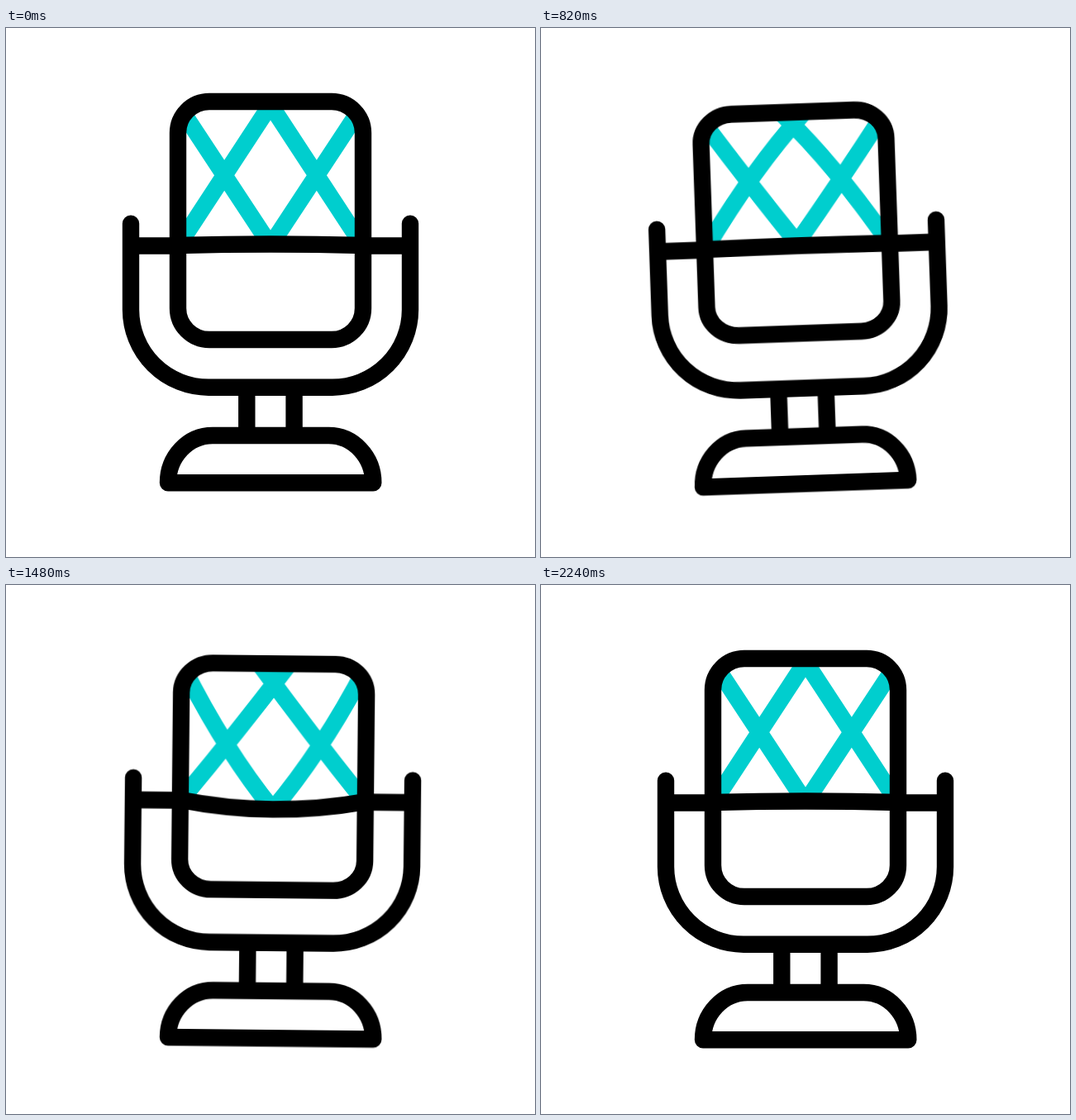
An HTML page without scripts that plays this animation: 640x640 px, repeating every 2.4 s.

```html
<!DOCTYPE html>
<html lang="en">
<head>
<meta charset="utf-8">
<title>Microphone</title>
<style>
  html, body { margin: 0; width: 100%; height: 100%; overflow: hidden; background: #fff; }
  svg { display: block; width: 100%; height: 100%; fill: none; stroke: #000; stroke-width: 20.4; }

  .hop, .tilt, .head, .seam, .net { animation: 2.4s cubic-bezier(.37, 0, .63, 1) infinite; }
  .hop  { animation-name: hop; }
  .tilt { animation-name: tilt; transform-origin: 320px 550px; }
  .head { animation-name: squash; x: 208px; y: 89px; width: 224px; height: 288px; rx: 38px; ry: 38px; }
  .seam { animation-name: bow; }
  .net  { animation-name: weave; stroke: #00cece; }

  @keyframes hop {
    0%, 2.5%, 71.7%, 100% { transform: translateY(0); }
    19.2%, 30% { transform: translateY(2.5px); }
    45.4% { transform: translateY(-6.2px); }
  }
  @keyframes tilt {
    0%, 2.5%, 72.5%, 100% { transform: rotate(0deg); }
    15% { transform: rotate(2deg); }
    34.2% { transform: rotate(-2deg); }
    52.7% { transform: rotate(1deg); }
  }
  @keyframes squash {
    0%, 2.5%, 93.3%, 100% { y: 89px; height: 288px; ry: 38px; }
    25% { y: 106px; height: 258.2px; ry: 34px; }
    46.7% { y: 91.5px; height: 283.6px; ry: 37.5px; }
    69.2% { y: 99px; height: 270.5px; ry: 35.7px; }
  }
  @keyframes bow {
    0%, 2.5%, 93.3%, 100% { d: path("M208 263Q320 260 432 263"); }
    25% { d: path("M208 263Q320 224 432 263"); }
    45.8% { d: path("M208 263Q320 315.5 432 263"); }
    78.3% { d: path("M208 263Q320 250 432 263"); }
  }
  /* Two strands of the left half: rising, then falling */
  @keyframes weave {
    0%, 2.5%, 93.3%, 100% { d: path("M208 264Q264 178.5 320 93M208 93Q264 178 320 263"); }
    25% { d: path("M208 264Q258 150 320 107M208 110Q274 160 320 238"); }
    45.8% { d: path("M208 264Q291 187 355 92M207 94Q252 223 320 289"); }
    78.3% { d: path("M208 264Q260 174 321 102M208 102Q267 175 320 257"); }
  }
</style>
</head>
<body>
<svg viewBox="0 0 640 640">
  <clipPath id="inside"><rect class="head"/></clipPath>
  <g class="hop">
    <g class="tilt">
      <g clip-path="url(#inside)">
        <path class="net" d="M208 264Q264 178.5 320 93M208 93Q264 178 320 263"/>
        <g transform="matrix(-1 0 0 1 640 0)">
          <path class="net" d="M208 264Q264 178.5 320 93M208 93Q264 178 320 263"/>
        </g>
      </g>
      <rect class="head"/>
      <path class="seam" d="M208 263Q320 260 432 263"/>
      <path d="M151 263.5H208M432 263.5H489M291.3 435V493M348.6 435V493"/>
      <path stroke-linecap="round" d="M151 236.6V341A94 94 0 0 0 245 434.7H395A94 94 0 0 0 489 341V236.6"/>
      <path stroke-linejoin="round" d="M196 550.3A54 57.3 0 0 1 250 493H390A54 57.3 0 0 1 444.3 550.3Z"/>
    </g>
  </g>
</svg>
</body>
</html>
```
